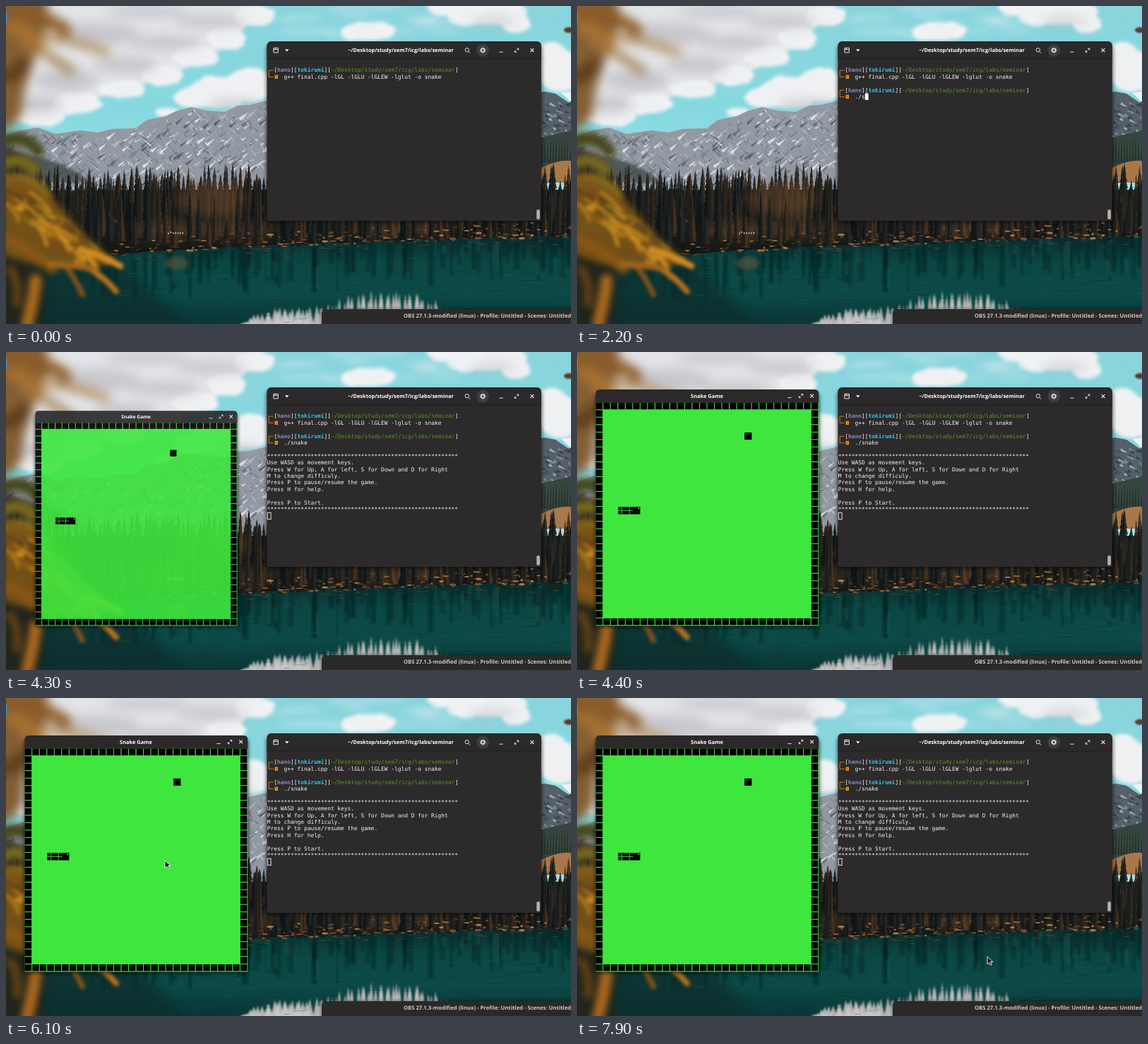
An HTML page that plays this animation: 800 by 450 pixels, repeating every 8 s.

```html
<!DOCTYPE html>
<html lang="en">
<head>
<meta charset="utf-8">
<title>Snake from the terminal</title>
<style>
html, body { margin: 0; width: 100%; height: 100%; overflow: hidden; background: #17201f; }
svg { position: absolute; left: 0; top: 0; width: 800px; height: 450px; display: block; }
#photo { will-change: transform; }
text { text-rendering: geometricPrecision; white-space: pre; }
.mono { font: 7.89px "DejaVu Sans Mono", monospace; fill: #f4f2f3; }
.title { font: bold 7.45px "Open Sans", "Noto Sans", sans-serif; fill: #fff; }
.icon { fill: none; stroke: #e6e6e6; stroke-width: 1; }
</style>
</head>
<body>
<svg id="photo" viewBox="0 0 800 450"></svg>
<svg id="screen" viewBox="0 0 800 450"></svg>
<script>
const LOOP = 8000, STEP = 100;
const photo = document.getElementById('photo');
const screen = document.getElementById('screen');

let seed = 11;
const rnd = (a = 0, b = 1) => {
  seed = (seed * 16807) % 2147483647;
  return a + (b - a) * seed / 2147483647;
};
const pick = list => list[Math.floor(rnd() * list.length)];
const times = (n, fn) => Array.from({ length: n }, (_, i) => fn(i)).join('');
const f = n => n.toFixed(1);

const rect = (x, y, w, h, fill, more = '') =>
  `<rect x="${f(x)}" y="${f(y)}" width="${f(w)}" height="${f(h)}" fill="${fill}" ${more}/>`;
const path = (d, fill, more = '') => `<path d="${d}" fill="${fill}" ${more}/>`;
const oval = (x, y, rx, ry, fill, more = '') =>
  `<ellipse cx="${f(x)}" cy="${f(y)}" rx="${f(rx)}" ry="${f(ry)}" fill="${fill}" ${more}/>`;
const group = (inner, more = '') => `<g ${more}>${inner}</g>`;
const blur = n => `filter="url(#blur${n})"`;
const gradient = (id, ...stops) =>
  `<linearGradient id="${id}" x2="0" y2="1">${stops.map(([o, c]) =>
    `<stop offset="${o}" stop-color="${c}"/>`).join('')}</linearGradient>`;

/* ---------- landscape ---------- */

function conifer(x, base, h, w, dark, light) {
  const tiers = 9, side = s => {
    let d = '';
    for (let i = 1; i <= tiers; i++) {
      const y = base - h + h * i / tiers, reach = w * Math.pow(i / tiers, .75) * rnd(.7, 1.1);
      d += `L${f(x + s * reach)} ${f(y)}L${f(x + s * reach * .6)} ${f(y - 1)}`;
    }
    return `M${f(x)} ${f(base - h)}${d}L${f(x)} ${f(base)}Z`;
  };
  return path(side(-1), dark) + path(side(1), light);
}

function clouds() {
  const puff = ([x, y, rx, ry]) => oval(x, y, rx, ry, '#eef0f2') + times(10, () => {
    const a = rnd(0, 6.28), r = rnd(.12, .3) * rx;
    return oval(x + Math.cos(a) * rx * .85, y + Math.sin(a) * ry * .85, r, r * .6, '#f1f3f4', 'opacity=".8"');
  });
  const rim = [[352, 14, 28, 14], [312, 46, 26, 16], [268, 72, 32, 14], [222, 98, 28, 14],
    [165, 118, 32, 12], [100, 138, 34, 14], [50, 156, 34, 14]];
  const low = [[345, 112, 34, 24], [300, 122, 42, 22], [262, 130, 24, 14], [228, 150, 16, 6]];
  const right = [[682, 8, 56, 18], [640, 2, 42, 10], [722, 24, 20, 14], [512, 36, 38, 13],
    [785, 92, 32, 30], [772, 66, 22, 14]];
  const wisps = times(16, () =>
    oval(rnd(385, 620), rnd(0, 45), rnd(14, 40), rnd(2, 5), '#e2eef0', 'opacity=".35"'));
  const shade = [[130, 40, 60, 16], [85, 105, 45, 16], [225, 52, 50, 10], [290, 22, 50, 9],
    [170, 84, 45, 12], [325, 140, 40, 7], [690, 22, 32, 5], [40, 140, 40, 12], [200, 8, 60, 8]]
    .map(p => oval(...p, '#bdbcc4', 'opacity=".7"')).join('');
  return group(wisps, blur(6)) +
    group(path('M-10 -10H372L330 40L290 72L225 102L150 124L80 146L-10 165Z', '#e3e4e7') +
      rim.map(puff).join('') + low.map(puff).join('') + right.map(puff).join(''), blur(3)) +
    group(shade, blur(9));
}

function mountains() {
  const ridge = [[0, 184], [22, 176], [45, 172], [70, 181], [105, 176], [130, 179], [150, 174],
    [183, 173], [200, 161], [226, 156], [240, 149], [262, 143], [284, 148], [310, 150],
    [328, 141], [345, 140], [370, 134], [420, 140]];
  const top = x => {
    const i = Math.max(1, ridge.findIndex(p => p[0] >= x)), [a, b] = [ridge[i - 1], ridge[i]];
    return a[1] + (b[1] - a[1]) * (x - a[0]) / (b[0] - a[0]);
  };
  // slanted slivers: snow in the gullies, bare rock on the faces
  const slivers = times(1000, () => {
    const x = rnd(0, 385), y = top(x) + rnd(1, 90), h = rnd(3, 13), lean = pick([-.9, .7, 1.1]) * h, w = rnd(1, 4);
    const color = pick(['#e6eaef', '#d3d8df', '#b4bac3', '#7d838d', '#666d77', '#575d68']);
    return path(`M${f(x)} ${f(y)}l${f(lean)} ${f(h)}l${f(-w)} ${f(-h * .3)}Z`, color, 'opacity=".85"');
  });
  const line = 'M' + ridge.map(p => p.join(' ')).join('L') + 'L420 260L0 260Z';
  return path(line, '#9299a3') + slivers +
    path('M0 205Q40 208 90 228L120 250H0Z', '#3f4a4a', `opacity=".8" ${blur(3)}`) +
    path('M740 126L762 121L778 124L800 139V250H740Z', '#56606b') +
    times(60, () => path(`M${f(rnd(752, 800))} ${f(rnd(134, 190))}l${f(rnd(3, 10))} 5l-7 -1Z`,
      pick(['#a3acb5', '#3a434b', '#7d8790', '#424b54']))) +
    path('M786 123L800 121V136Z', '#eef2f4') +
    path('M750 188L800 176V240H750Z', '#37453f') +
    times(14, i => conifer(752 + i * 4, 222, rnd(20, 38), 4, '#27332f', '#3c4a40')) +
    path('M752 232Q780 217 800 219V250H752Z', '#a8784a');
}

function forest() {
  const tones = [['#1a1d1c', '#2f2720'], ['#131819', '#232624'], ['#221d19', '#41301f'], ['#101516', '#1e2020']];
  const row = (n, base, low, high, wide) => times(n, i => {
    const x = -10 + 820 * (i + rnd(0, .9)) / n;
    return conifer(x, base + rnd(-6, 6), rnd(low, high), wide * rnd(.7, 1.2), ...pick(tones));
  });
  const glow = [[290, 275, 50, 26], [235, 318, 60, 12], [330, 318, 50, 10], [560, 318, 60, 9]]
    .map(p => oval(...p, '#8f5c33', 'opacity=".38"')).join('');
  return rect(0, 262, 800, 92, 'url(#wood)') + row(140, 306, 60, 84, 9) + row(85, 325, 60, 96, 9) +
    group(glow, blur(9)) + row(60, 338, 40, 88, 8) +
    times(120, () => rect(rnd(60, 800), rnd(240, 320), .8, rnd(4, 14), '#8a6040', 'opacity=".35"'));
}

function lake() {
  const shore = x => 354 - 29 * Math.pow(Math.max(0, x - 150) / 650, .6);
  let edge = 'M0 356';
  for (let x = 150; x <= 800; x += 25) edge += `L${x} ${f(shore(x))}`;
  const streaks = times(170, () => {
    const x = rnd(0, 800), h = rnd(10, 60);
    return rect(x, shore(x) + rnd(0, 10), rnd(2, 8), h, pick(['#082322', '#092c2b', '#10544e', '#071f20']), 'opacity=".45"');
  });
  const hump = (x, mid, wide) => Math.exp(-(((x - mid) / wide) ** 4));
  const spikes = times(70, i => {
    const x = 338 + i * 5 + rnd(-3, 3), h = 48 * hump(x, 540, 95) + 25 * hump(x, 395, 52);
    return path(`M${f(x - 6)} 452L${f(x)} ${f(452 - h * rnd(.72, 1.05))}L${f(x + 6)} 452Z`, '#cfc8c7', 'opacity=".85"');
  });
  const ripples = times(110, () => rect(rnd(130, 800), rnd(355, 450), rnd(6, 30), .7, pick(['#176a64', '#062827']), 'opacity=".45"'));
  const stones = times(330, () => {
    const x = rnd(150, 800), up = rnd(0, 1) ** 2 * 22;
    return oval(x, shore(x) + 2 - up, rnd(1, 5), rnd(.5, 1.6), pick(['#9c6330', '#c08a50', '#4a3524', '#75492a', '#1c1a18', '#141716']), 'opacity=".85"');
  });
  const sheen = times(70, () => {
    const x = rnd(150, 800);
    return rect(x, shore(x) + rnd(2, 14), rnd(3, 12), 1, pick(['#6b4a30', '#0a2524']), 'opacity=".6"');
  });
  return path(edge + 'V450H0Z', 'url(#water)') + group(streaks, blur(1)) +
    path('M0 354H160L250 450H0Z', '#082a2b', `opacity=".65" ${blur(9)}`) +
    group(spikes, blur(1)) + ripples + stones + sheen +
    oval(242, 364, 17, 9, '#86603f', `opacity=".4" ${blur(3)}`) +
    times(7, i => oval(230 + i * 3.4, 321 + rnd(-1, 1), .8, 1.4, '#c9b8a8'));
}

function leaves() {
  const stroke = (d, color, w, more = '') =>
    path(d, 'none', `stroke="${color}" stroke-width="${w}" stroke-linecap="round" ${more}`);
  const far = path('M-20 -20H58L60 30L42 70L26 120L20 160L-20 190Z', '#79501f', 'opacity=".9"') +
    stroke('M30 50Q75 36 142 66', '#b08a55', 13, 'opacity=".8"') +
    stroke('M25 50Q60 68 92 92', '#9c7541', 13, 'opacity=".8"') +
    stroke('M10 12Q50 8 84 34', '#8c5a26', 18) + stroke('M8 30Q30 34 44 56', '#a8702e', 18) +
    stroke('M0 100Q15 96 24 84', '#5f3d1c', 22);
  const olive = stroke('M0 190Q28 180 46 206', '#45481f', 18) + stroke('M0 222Q20 212 40 232', '#77671d', 16) +
    stroke('M0 250Q30 240 55 268', '#8f7a1e', 18);
  const body = path('M-5 240Q30 236 66 272L112 325L158 364L110 366L60 372L-5 352Z', '#7d561a', 'opacity=".9"');
  const blades = times(64, i => {
    const k = i / 64, x = 118 * k + rnd(-10, 8), y = 250 + 92 * k + rnd(-8, 40 - 24 * k);
    return stroke(`M${f(x)} ${f(y)}q12 5 ${f(rnd(16, 40))} ${f(rnd(14, 32))}`,
      pick(['#c98a1e', '#b57a1a', '#d99426', '#9a7a1c', '#7a4f16', '#5c3f16']), f(rnd(3, 7)), 'opacity=".85"');
  });
  const tips = stroke('M105 345Q135 352 162 368', '#cf8a22', 9) + stroke('M100 362Q135 378 156 404', '#b87320', 8) +
    stroke('M84 368Q98 385 108 408', '#80501a', 8) + stroke('M62 365Q90 366 124 372', '#9c651c', 8);
  const bottom = stroke('M42 388Q40 412 30 450', '#a8661a', 17) + stroke('M5 372Q18 385 16 420', '#5f3f16', 12) +
    stroke('M0 330Q35 345 66 372', '#8a5716', 14);
  return path('M-20 180Q50 215 62 300L50 460H-20Z', '#2a2314', `opacity=".75" ${blur(9)}`) +
    group(far, blur(9)) + group(olive, blur(6)) + group(body + bottom, blur(6)) + group(blades + tips, blur(3)) +
    group(oval(797, 34, 7, 4, '#5a3a2c'), blur(1));
}

photo.innerHTML = `<defs>
  ${[1, 3, 6, 9].map(n => `<filter id="blur${n}" x="-30%" y="-30%" width="160%" height="160%"><feGaussianBlur stdDeviation="${n * .8}"/></filter>`).join('')}
  ${gradient('sky', [0, '#8ad4dc'], [.6, '#86d9e0'], [1, '#a9e2e8'])}
  ${gradient('wood', [0, '#241f1b'], [1, '#141716'])}
  ${gradient('water', [0, '#0a2b2a'], [.3, '#0c4643'], [.65, '#0c4a47'], [1, '#0a3536'])}
  </defs>` + rect(0, 0, 800, 260, 'url(#sky)') + clouds() + mountains() + forest() + lake() + leaves() +
  rect(0, 9, 1, 16, '#3c9fe6');

/* ---------- desktop windows ---------- */

const CELL = 4.75, LINE = 9.4, LEFT = 369.8, TOP = 86;
const colX = c => LEFT + c * CELL, rowY = r => TOP + r * LINE;
const put = (col, row, s, more = '') =>
  `<text class="mono" x="${f(colX(col))}" y="${f(rowY(row) + 7.3)}" ${more}>${s}</text>`;
const title = (x, y, s, more = 'text-anchor="middle"') => `<text class="title" x="${x}" y="${y}" ${more}>${s}</text>`;
const icon = (d, more = '') => `<path class="icon" d="${d}" ${more}/>`;
const topRound = (x, y, w, h, r) =>
  `M${x} ${y + h}V${y + r}q0 ${-r} ${r} ${-r}h${w - 2 * r}q${r} 0 ${r} ${r}V${y + h}Z`;

const windowButtons = (min, max, close, y) =>
  icon(`M${min - 2.7} ${y + 2.6}h5.4`) +
  icon(`M${max + .3} ${y - 2.5}h2.4v2.4M${max - .3} ${y + 2.7}h-2.4v-2.4M${max + .6} ${y - .4}l2 -2M${max - .6} ${y + .6}l-2 2`) +
  icon(`M${close - 2.4} ${y - 2.4}l4.8 4.8m0 -4.8l-4.8 4.8`, 'style="stroke-width:1.2"');

function prompt(row) {
  const y = rowY(row) + 5, bold = c => `style="font-weight:bold;fill:${c}"`;
  return path(`M378.6 ${f(y)}H372.2V${f(y + LINE)}H378.6`, 'none', 'stroke="#d98612" stroke-width=".9"') +
    rect(380.6, y + 6.7, 4.4, 5.2, '#f09a18') + rect(382, y + 8.4, 1.6, 2, '#8a5510') +
    put(2, row, '[') + put(3, row, 'hano', bold('#8d86bd')) + put(7, row, '][') +
    put(9, row, 'tokirumi', bold('#2cc8ec')) + put(17, row, '][') +
    put(19, row, '~/Desktop/study/sem7/icg/labs/seminar', 'style="fill:#549a1c"') + put(56, row, ']');
}

const stars = '*'.repeat(57);
const help = [stars, 'Use WASD as movement keys.', 'Press W for Up, A for left, S for Down and D for Right',
  'M to change difficuly.', 'Press P to pause/resume the game.', 'Press H for help.', '', 'Press P to Start.', stars];

const terminal =
  rect(368, 54, 391.5, 252, '#000', `rx="7" opacity=".5" ${blur(3)}`) +
  path(topRound(369.5, 50, 388.3, 254, 7), '#2d2a2c') +
  path(topRound(369.5, 50, 388.3, 25, 7), '#2b2929') + rect(369.5, 74.6, 388.3, .8, '#1f1d1e') +
  icon('M378.9 59.3h6.4v6.6h-6.4zM378.9 61.6h6.4M381.2 59.3v2.3') +
  path('M395 61.2h5.6l-2.8 3.2Z', '#f2f2f2') +
  title(559, 65.4, '~/Desktop/study/sem7/icg/labs/seminar') +
  icon('M655 64.6l2 2.1') + '<circle class="icon" cx="652.8" cy="62.2" r="2.7"/>' +
  '<circle cx="675.2" cy="62.6" r="9" fill="#3f3c3d"/>' +
  '<circle class="icon" cx="675.2" cy="62.6" r="2.4" style="stroke-width:1.5"/>' +
  '<circle class="icon" cx="675.2" cy="62.6" r="3.6" stroke-dasharray="1.4 1.4"/>' +
  windowButtons(701, 723, 745, 62.6) +
  rect(751.3, 288, 4.6, 14, '#b4b1b2', 'rx="2"') +
  prompt(0) + put(5, 1, 'g++ final.cpp -lGL -lGLU -lGLEW -lglut -o snake');

const recorder = rect(445, 428, 370, 30, '#000', `rx="7" opacity=".4" ${blur(3)}`) +
  path('M447 450V436q0 -7 7 -7H800V450Z', '#2b2928') +
  title(563, 441.4, 'OBS 27.1.3-modified (linux) - Profile: Untitled - Scenes: Untitled',
    'style="font-size:7.65px;fill:#cbc8c6"');

function snakeWindow() {
  const x0 = 26.8, y0 = 71.8, c = 10.52, n = 30;
  const tile = (i, j, s = c - 1.1) => rect(x0 + i * c, y0 + j * c, s, s, '#000');
  const wall = times(n, i => tile(i, 0) + tile(i, n - 1) + (i && i < n - 1 ? tile(0, i) + tile(n - 1, i) : ''));
  const sx = x0 + 3 * c, sy = y0 + 14 * c, green = '#3ee63e';
  const snake = rect(sx, sy, 3 * c - .6, c, '#000') +
    rect(sx, sy + c / 2 - .4, 2 * c, .9, green) +
    rect(sx + c / 2 - .4, sy, .9, c, green) + rect(sx + 1.5 * c - .4, sy, .9, c, green) +
    rect(sx + 28.2, sy + 1.2, 1.6, 1.6, '#d8ffd8');
  return rect(25, 57, 319, 333, '#000', `rx="6" opacity=".5" ${blur(3)}`) +
    path(topRound(26.5, 53, 315.8, 335, 6), '#2b2929') +
    title(184, 65.2, 'Snake Game') + windowButtons(301, 317, 332.6, 62) +
    rect(x0, y0, n * c - .2, n * c, green) + wall + tile(20, 4, c - .3) + snake;
}

screen.innerHTML = recorder + terminal +
  group(prompt(3) + put(5, 4, '', 'id="typed"'), 'id="second"') +
  group(help.map((s, i) => put(0, 6 + i, s)).join(''), 'id="help"') +
  rect(0, 0, CELL, LINE, '#fff', 'id="caret"') +
  group(snakeWindow(), 'id="game"') +
  path('M0 0V10.6L2.6 8.2L4.3 12L6.2 11.1L4.5 7.5H8Z', '#111', 'id="arrow" stroke="#fff" stroke-width=".9"') +
  group(['#111" stroke-width="2.4', '#d5d5d5" stroke-width=".9'].map(s =>
    path('M-2.4 -5Q0 -5 0 -3.6Q0 -5 2.4 -5M0 -4V4M-2.4 5Q0 5 0 3.6Q0 5 2.4 5', 'none', `stroke="${s}"`)).join(''), 'id="beam"');

const [second, typed, helpText, caret, game, arrow, beam] =
  ['second', 'typed', 'help', 'caret', 'game', 'arrow', 'beam'].map(id => document.getElementById(id));

/* ---------- motion ---------- */

const command = './snake';
const keyTimes = [600, 800, 2200, 2300, 2700, 2900, 3100];
const mouse = [[4700, 672, 222], [4900, 628, 208], [5000, 602, 200], [5300, 232, 196], [5700, 232, 196],
  [6100, 225, 230], [6900, 225, 230], [7500, 660, 392], [7600, 660, 392], [7900, 581, 366]];

const show = (el, on) => el.setAttribute('visibility', on ? 'visible' : 'hidden');
const set = (el, attrs) => { for (const k in attrs) el.setAttribute(k, attrs[k]); };

function mouseAt(t) {
  const i = mouse.findIndex(p => p[0] >= t);
  if (i < 1) return mouse[i < 0 ? mouse.length - 1 : 0].slice(1);
  const [a, b] = [mouse[i - 1], mouse[i]], k = (t - a[0]) / (b[0] - a[0]);
  return [a[1] + (b[1] - a[1]) * k, a[2] + (b[2] - a[2]) * k];
}

function drawCaret(t, count) {
  const started = t >= 4200, entered = t >= 3800;
  const [col, row] = started ? [0, 15] : entered ? [0, 6] : [5 + count, 4];
  show(caret, t >= 200 && !(t >= 1400 && t < 2000));
  set(caret, {
    x: colX(col) + (started ? .5 : 0), y: rowY(row) + (started ? .2 : 0),
    fill: started ? 'none' : '#fff', stroke: started ? '#e6e4e5' : 'none'
  });
}

function draw(t) {
  const count = keyTimes.filter(k => k <= t).length;
  show(second, t >= 200);
  typed.textContent = command.slice(0, count);
  show(helpText, t >= 4200);
  drawCaret(t, count);

  // the window grows from its bottom edge, easing out exponentially
  const grow = t >= 4400 ? 1 : 1 - Math.pow(2, -10 * Math.max(0, t - 4249) / 150);
  show(game, grow > 0);
  set(game, {
    opacity: grow,
    transform: `translate(184.5 388) scale(${.01 + .99 * grow} ${.05 + .95 * grow}) translate(-184.5 -388)`
  });

  const [x, y] = mouseAt(t), seen = t >= 4700;
  const overText = x > 370 && x < 751 && y > 76 && y < 304;
  show(arrow, seen && !overText);
  show(beam, seen && overText);
  set(overText ? beam : arrow, { transform: `translate(${x} ${y})` });
}

const begin = performance.now();
let last = -1;
function tick() {
  const t = Math.floor((performance.now() - begin) % LOOP / STEP) * STEP;
  if (t !== last) draw(last = t);
  requestAnimationFrame(tick);
}
tick();
</script>
</body>
</html>
```
